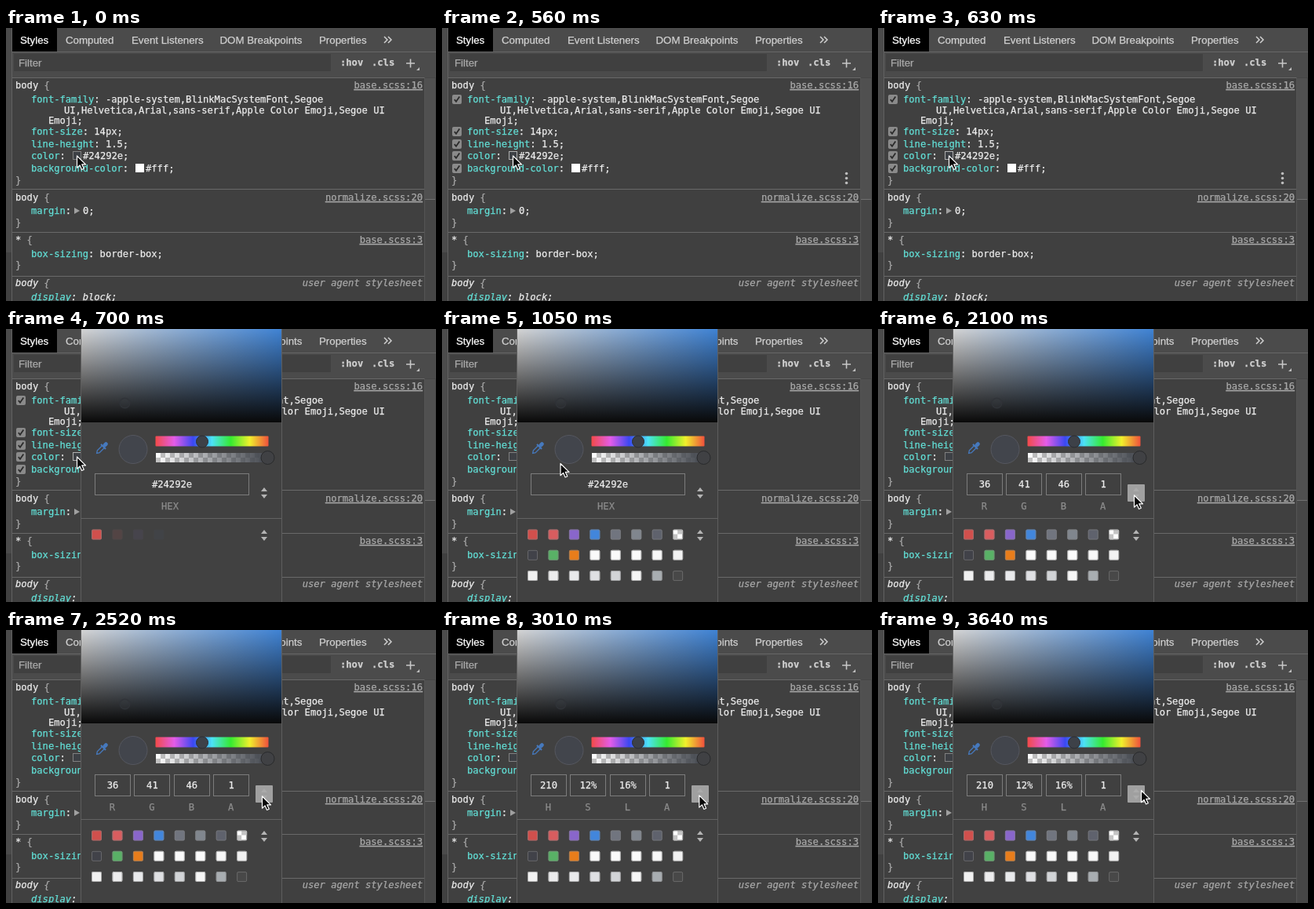
Recreate the animation shown at these times as an HTML page. Size 548 by 348 pixels, loop 3.71 s.

```html
<!DOCTYPE html>
<html lang="en">
<head>
<meta charset="utf-8">
<title>Styles pane color picker</title>
<style>
  html, body { margin: 0; width: 100%; height: 100%; overflow: hidden; background: #404040; }
  svg { display: block; width: 548px; height: 348px; }
  text { white-space: pre; font: 12.13px "DejaVu Sans Mono", "Liberation Mono", monospace; stroke-width: .25px; }
  .ui { font: 13.3px "Liberation Sans", Arial, sans-serif; }
  .bold { font-weight: bold; }
  .italic { font-style: italic; }
</style>
</head>
<body>
<svg id="stage" viewBox="0 0 548 348" xmlns="http://www.w3.org/2000/svg">
  <defs>
    <linearGradient id="saturation"><stop stop-color="#f6f6f6"/><stop offset="1" stop-color="#4897f6"/></linearGradient>
    <linearGradient id="value" x2="0" y2="1"><stop stop-color="#090909" stop-opacity="0"/><stop offset="1" stop-color="#090909"/></linearGradient>
    <linearGradient id="hue"></linearGradient>
    <linearGradient id="alpha"><stop stop-color="#42464d" stop-opacity="0"/><stop offset="1" stop-color="#42464d"/></linearGradient>
    <pattern id="checker" width="12" height="12" patternUnits="userSpaceOnUse">
      <path fill="#fff" d="M0 0h12v12H0z"/><path fill="#c4c4c4" d="M6 0h6v6H6zM0 6h6v6H0z"/>
    </pattern>
  </defs>
  <g id="pane"></g>
  <g id="hover"></g>
  <g id="picker"></g>
  <path id="cursor" d="M0 0V15.2L3.6 11.9L6.1 17.5L8.8 16.3L6.3 10.9H11Z" fill="#080808" stroke="#fff" stroke-width="1.2" stroke-linejoin="round"/>
</svg>
<script>
const FRAME = 70, LOOP = 3710;
const byId = id => document.getElementById(id);

function add(parent, tag, attrs, content) {
  const node = document.createElementNS("http://www.w3.org/2000/svg", tag);
  for (const key in attrs) node.setAttribute(key, attrs[key]);
  if (content !== undefined) node.textContent = content;
  return parent.appendChild(node);
}
const rect = (parent, x, y, width, height, fill, extra) =>
  add(parent, "rect", { x, y, width, height, fill, ...extra });
const path = (parent, d, fill, extra) => add(parent, "path", { d, fill, ...extra });
const text = (parent, x, y, fill, content, extra) =>
  add(parent, "text", { x, y, fill, stroke: fill, ...extra }, content);
const span = (parent, fill, content, extra) =>
  add(parent, "tspan", { fill, stroke: fill, ...extra }, content);
const circle = (parent, cx, cy, r, fill, extra) =>
  add(parent, "circle", { cx, cy, r, fill, ...extra });
const show = (node, visible) => node.setAttribute("visibility", visible ? "inherit" : "hidden");

const pane = byId("pane"), hover = byId("hover"), picker = byId("picker"), cursor = byId("cursor");
const CYAN = "#62dfd6", LIGHT = "#ececec", DIM = "#a8a8a8";

function drawToolbar() {
  rect(pane, 0, 0, 548, 348, "#404040");
  rect(pane, 0, 0, 7, 286, "#4b4b4b");
  rect(pane, 8, 0, 540, 63, "#4b4b4b");
  rect(pane, 7, 0, 1, 348, "#616161");
  rect(pane, 8, 0, 57, 30, "#000");
  rect(pane, 8, 30, 540, 1, "#676767");
  rect(pane, 10, 33, 404, 22, "#404040");
  const tabs = { Styles: 18, Computed: 76, "Event Listeners": 160, "DOM Breakpoints": 272.5, Properties: 399 };
  for (const name in tabs)
    text(pane, tabs[name], 20, name === "Styles" ? "#fff" : "#d0d0d0", name, { class: "ui" });
  path(pane, "M482 11L486 15L482 19M487 11L491 15L487 19", "none", { stroke: "#d0d0d0", "stroke-width": 1.5 });
  text(pane, 16, 49, "#a8a8a8", "Filter", { class: "ui" });
  text(pane, 426, 48, "#d0d0d0", ":hov", { class: "bold" });
  text(pane, 466, 48, "#d0d0d0", ".cls", { class: "bold" });
  path(pane, "M510 45H521M515.5 39.5V50.5", "none", { stroke: "#c8c8c8", "stroke-width": 1.6 });
  path(pane, "M527 50V54H523Z", "#bdbdbd");
  rect(pane, 533, 63, 15, 285, "#464646");
  rect(pane, 533, 63, 1, 285, "#555");
  rect(pane, 534, 64, 13, 154, "#505050");
  rect(pane, 534, 218, 13, 1, "#707070");
  for (const y of [63, 205, 260, 316]) rect(pane, 8, y, 525, 1, "#696969");
}

function selector(y, name, origin, style = "") {
  const line = text(pane, 12, y, LIGHT, "", { class: style });
  span(line, LIGHT, name);
  span(line, DIM, " {");
  text(pane, 531, y, DIM, origin, {
    class: style, "text-anchor": "end", "text-decoration": style ? "none" : "underline" });
}

function declaration(y, name, value, { valueX, style = "" } = {}) {
  const line = text(pane, 32, y, LIGHT, "", { class: style });
  span(line, CYAN, name);
  span(line, LIGHT, ": ");
  span(line, LIGHT, value, valueX && { x: valueX });
}

function drawRules() {
  selector(77, "body", "base.scss:16");
  declaration(94.5, "font-family", "-apple-system,BlinkMacSystemFont,Segoe");
  text(pane, 74, 108.5, LIGHT, "UI,Helvetica,Arial,sans-serif,Apple Color Emoji,Segoe UI");
  text(pane, 54, 122, LIGHT, "Emoji;");
  declaration(136, "font-size", "14px;");
  declaration(152, "line-height", "1.5;");
  declaration(167, "color", "#24292e;", { valueX: 98 });
  declaration(183, "background-color", "#fff;", { valueX: 178 });
  rect(pane, 85.5, 157.5, 10, 10, "#3d4045", { stroke: "#808080" });
  rect(pane, 165, 173, 11, 11, "#fff");
  selector(220, "body", "normalize.scss:20");
  declaration(237, "margin", "0;", { valueX: 98 });
  path(pane, "M87 229L94 233L87 237Z", "#a0a0a0");
  selector(274, "*", "base.scss:3");
  declaration(292, "box-sizing", "border-box;");
  selector(329, "body", "user agent stylesheet", "italic");
  declaration(347, "display", "block;", { style: "italic" });
  for (const y of [198, 252, 306]) text(pane, 12, y, DIM, "}");
}

function drawHover() {
  for (const y of [91, 132, 148, 163, 179]) {
    rect(hover, 13, y - 6, 12, 12, "#8a8a8a", { rx: 2 });
    path(hover, `M15.8 ${y + .2}L18 ${y + 2.8}L22.3 ${y - 3.4}`, "none", { stroke: "#2c2c2c", "stroke-width": 1.8 });
  }
  rect(hover, 85.5, 157.5, 10, 10, "none", { stroke: "#b0b0b0" });
  const menu = add(hover, "g", {});
  for (const y of [185.5, 191.5, 197.5]) circle(menu, 515.5, y, 1.8, "#bcbcbc");
  return menu;
}

function arrows(parent, y, fill) {
  path(parent, `M325 ${y - 2}L329 ${y - 7}L333 ${y - 2}ZM325 ${y + 2}H333L329 ${y + 7}Z`, fill);
}

function fields(values, labels) {
  const group = add(picker, "g", {});
  const middle = { "text-anchor": "middle" };
  values.forEach((value, i) => {
    const single = values.length === 1;
    const x = 113.5 + 50.4 * i, width = single ? 196 : 45;
    rect(group, Math.floor(x) + .5, 184.5, width, 27, "#404040", { stroke: "#7c7c7c" });
    text(group, x + width / 2, 202, LIGHT, value, middle);
    text(group, x + width / 2 - (single ? 2.5 : .5), 230, "#8c8c8c", labels[i], middle);
  });
  return group;
}

function drawPicker() {
  ["#f24a48", "#e45ce8", "#3b48f2", "#4ce2f6", "#35ea30", "#f0f02c", "#f0503c"].forEach((color, i) =>
    add(byId("hue"), "stop", { offset: i / 6, "stop-color": color }));
  rect(picker, 95, 0, 257, 348, "#5e5e5e");
  rect(picker, 96, 0, 255, 348, "#414141");
  for (const paint of ["saturation", "value"]) rect(picker, 96, -20, 255, 139, `url(#${paint})`);
  circle(picker, 151.5, 94.5, 6.3, "#41454b", { "fill-opacity": .2, stroke: "#303338", "stroke-width": 1.4 });

  const dropper = add(picker, "g", { transform: "translate(122 152) rotate(45)" });
  rect(dropper, -2.4, -10, 4.8, 7, "#4679bd", { rx: 2.2 });
  rect(dropper, -4.4, -4, 8.8, 2.2, "#4679bd", { rx: .8 });
  path(dropper, "M-2 -2V6L0 9L2 6V-2", "none", { stroke: "#4679bd", "stroke-width": 1.3 });

  circle(picker, 162, 153.5, 18, "#42454c", { stroke: "#55575f" });
  rect(picker, 190.5, 136.5, 144, 13, "url(#hue)", { rx: 1 });
  const opacity = add(picker, "g", { transform: "translate(191 158)" });
  for (const paint of ["checker", "alpha"]) rect(opacity, 0, 0, 143, 12, `url(#${paint})`);
  circle(picker, 250, 143.5, 7.5, "#3d4148", { stroke: "#2b2d32" });
  circle(picker, 333.5, 164, 8.5, "#404144", { stroke: "#292a2c" });
  rect(picker, 96, 241, 255, 1, "#626262");
  arrows(picker, 209, "#b4b4b4");
  arrows(picker, 263, "#b4b4b4");
}

const PALETTE = [
  "#d1504d", "#d95d5f", "#8966cb", "#4286dc", "#71757f", "#80868e", "#5f626d", "url(#checker)",
  "#414249", "#59b166", "#e97d1b", "#fafafa", "#fafafa", "#fbfbfb", "#f8f8f8", "#f2f2f2",
  "#f1f1f1", "#ececed", "#e9eaec", "#dfe0e3", "#d2d4d7", "#f6f6f6", "#a8adb1", "#484848"
];

function drawSwatches() {
  return PALETTE.map((color, i) => {
    const x = 109 + 26.45 * (i % 8), y = 255.5 + 26.3 * Math.floor(i / 8);
    const group = add(picker, "g", { transform: `translate(${x} ${y})` });
    rect(group, 0, 0, 13, 13, color, { rx: 2 });
    rect(group, .5, .5, 12, 12, "none", { rx: 1.5, stroke: "#808080", "stroke-opacity": .6 });
    return group;
  });
}

drawToolbar();
drawRules();
const menu = drawHover();
drawPicker();
const swatches = drawSwatches();
const formats = [
  { from: 0, node: fields(["#24292e"], ["HEX"]) },
  { from: 2030, node: fields(["36", "41", "46", "1"], [..."RGBA"]) },
  { from: 2940, node: fields(["210", "12%", "16%", "1"], [..."HSLA"]) }
];
const button = add(picker, "g", {});
rect(button, 318, 198, 22, 22, "#a0a0a0", { rx: 1 });
arrows(button, 209, "#ababab");

// Pointer stops: time, x, y
const ROUTE = [
  [0, 90.5, 163], [770, 90.5, 163], [1050, 151, 171.5], [1400, 262, 200], [1680, 320.5, 220],
  [1750, 320.5, 220], [1960, 326.5, 212], [2940, 326.5, 212], [3430, 335.5, 204.5], [LOOP, 335.5, 204.5]
];

function pointerAt(time) {
  const i = ROUTE.findIndex(stop => stop[0] > time);
  const [t0, x0, y0] = ROUTE[i - 1], [t1, x1, y1] = ROUTE[i];
  const k = (time - t0) / (t1 - t0);
  return [x0 + (x1 - x0) * k, y0 + (y1 - y0) * k];
}

function render(time) {
  show(hover, time >= 70 && time < 840);
  show(menu, time >= 70 && time < 700);
  show(picker, time >= 700);
  swatches.forEach((swatch, i) => {
    const fade = (time - 684 - i * 100 / PALETTE.length) / 100;
    swatch.setAttribute("opacity", i ? Math.min(1, Math.max(0, fade)) : 1);
  });
  formats.forEach(({ from, node }, i) =>
    show(node, time >= from && time < (formats[i + 1]?.from ?? LOOP)));
  show(button, time >= 1750);
  cursor.setAttribute("transform", `translate(${pointerAt(time)})`);
}

const start = performance.now();
function tick() {
  const elapsed = (performance.now() - start) % LOOP;
  render(Math.floor(elapsed / FRAME) * FRAME);
  requestAnimationFrame(tick);
}
tick();
</script>
</body>
</html>
```
